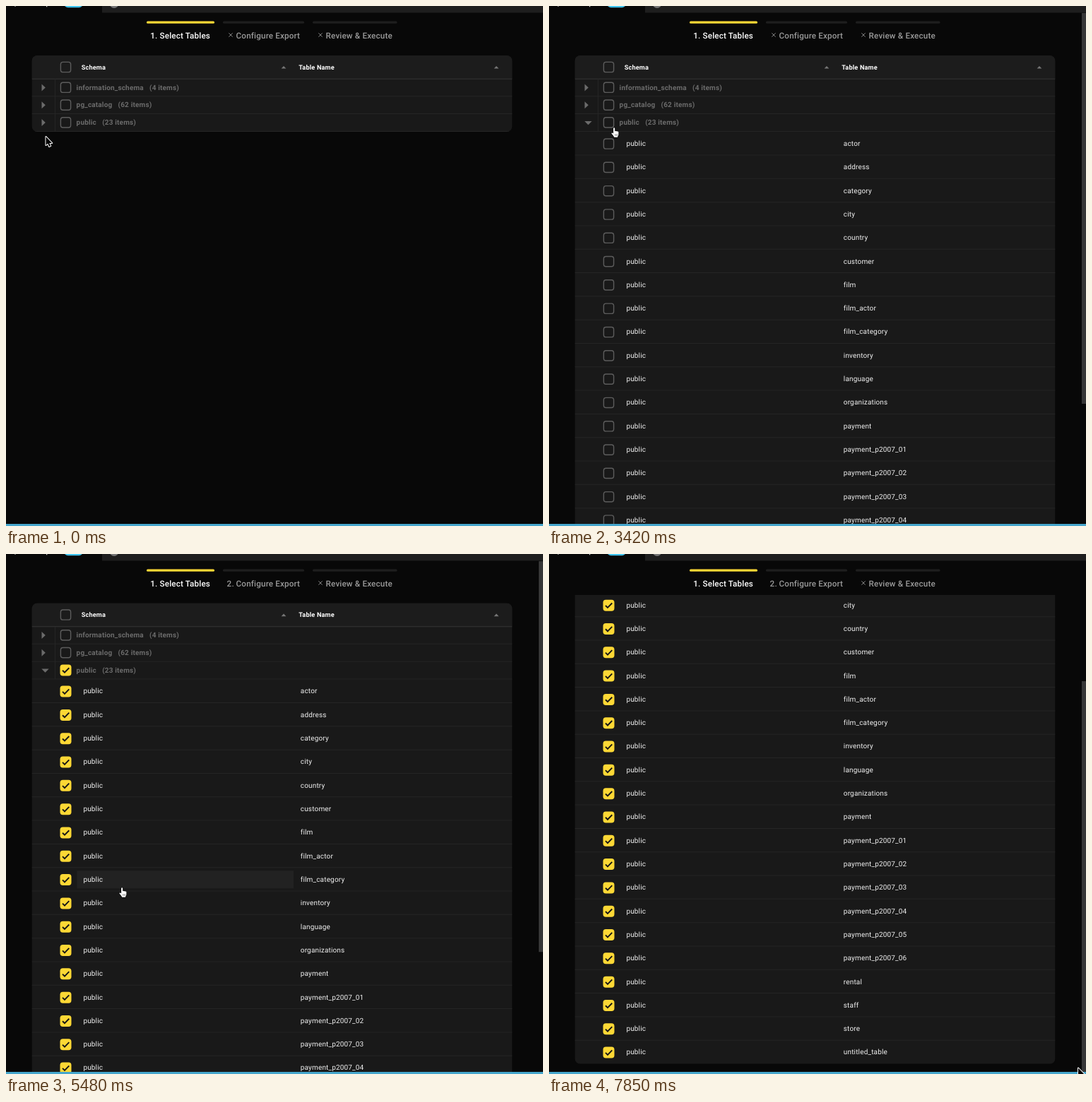
An HTML page with a canvas that plays this animation: 760 px wide and 736 px high, repeating every 8000 ms.

```html
<!DOCTYPE html>
<html lang="en">
<head>
<meta charset="utf-8">
<title>Select tables</title>
<style>
html, body { margin: 0; height: 100%; overflow: hidden; background: #080808; }
canvas { display: block; }
</style>
</head>
<body>
<canvas id="stage" width="760" height="736"></canvas>
<script>
const ctx = document.getElementById('stage').getContext('2d');
const LOOP = 8000, TICK = 148;
const EXPAND = 16, PRESS = 29, CHECKED = 31, SCROLL_START = 36.2, SCROLL_END = 41; // in ticks
const LEFT = 36.5, TOP = 70, WIDTH = 680, ROW = 33.31, ROWS_TOP = 178, MAX_SCROLL = 222.3;
const YELLOW = '#fdd835', GRAY = '#6b6b6b', RULE = '#252525';

const payments = [1, 2, 3, 4, 5, 6].map(n => 'payment_p2007_0' + n);
const tables = [...('actor address category city country customer film film_actor film_category ' +
  'inventory language organizations payment').split(' '), ...payments,
  'rental', 'staff', 'store', 'untitled_table'];
const groups = [['information_schema', 4], ['pg_catalog', 62], ['public', tables.length]];

// Eased pointer moves: start tick, end tick, destination
const moves = [
  [0, 1, 52, 160], [3, 5, 51, 166], [9, 11, 53.5, 173], [12, 13, 48.5, 165],
  [18, 21, 98, 162], [21, 23, 88, 172], [24, 27, 82.5, 159], [31, 36, 160, 472],
  [42, 43, 157, 470.5], [43, 50, 354, 628], [50, 53, 749, 727.5]
];

const progress = (t, from, to) => Math.min(1, Math.max(0, (t - from) / (to - from)));
const smooth = p => p * p * (3 - 2 * p);
const quintic = p => p < .5 ? 16 * p ** 5 : 1 - 16 * (1 - p) ** 5;

function pointerAt(tick) {
  let x = 56.5, y = 185;
  for (const [from, to, toX, toY] of moves) {
    const p = smooth(progress(tick, from, to));
    x += (toX - x) * p;
    y += (toY - y) * p;
  }
  return [x, y];
}

const arrow = new Path2D('M0 0V12L2.7 9.6L4.6 14L6.7 13.1L4.8 8.9H8.6Z');
const hand = new Path2D('M3.1 8.6V1.3a1 1 0 0 1 2.1 0V5.6a.9.9 0 0 1 1.8.1a.9.9 0 0 1 1.8.4' +
  'a.8.8 0 0 1 1.6.6V9.5q0 2-1.2 3.2V13.8H4.3Q3.8 12.3 .4 8.4q.2-1.5 1.5-.8z');
const knuckles = new Path2D('M5.6 9.2V11.8M7.1 9.2V11.8M8.6 9.2V11.8');

function rect(x, y, w, h, color, radius = 0) {
  ctx.fillStyle = color;
  ctx.beginPath();
  ctx.roundRect(x, y, w, h, radius);
  ctx.fill();
}

function poly(points, color) {
  ctx.fillStyle = color;
  ctx.beginPath();
  for (let i = 0; i < points.length; i += 2) ctx.lineTo(points[i], points[i + 1]);
  ctx.fill();
}

function line(points, color, width) {
  ctx.strokeStyle = color;
  ctx.lineWidth = width;
  ctx.beginPath();
  for (let i = 0; i < points.length; i += 2) ctx.lineTo(points[i], points[i + 1]);
  ctx.stroke();
}

// Returns the x where the text ends
function text(string, x, y, color, size = 10, weight = 400) {
  ctx.font = `${weight} ${size}px Roboto, sans-serif`;
  ctx.letterSpacing = '0.16px';
  ctx.textRendering = 'geometricPrecision';
  ctx.fillStyle = color;
  ctx.fillText(string, x, y);
  return x + ctx.measureText(string).width;
}

function checkbox(y, state) {
  if (state) {
    rect(76.5, y - 8, 16, 16, state === 'on' ? YELLOW : '#ececec', 4);
    if (state === 'on') line([80, y + .3, 83, y + 3.3, 89.3, y - 3.2], '#151515', 1.9);
    return;
  }
  ctx.strokeStyle = '#5c5c5c';
  ctx.lineWidth = 1.4;
  ctx.beginPath();
  ctx.roundRect(77.4, y - 7.1, 14.2, 14.2, 3.2);
  ctx.stroke();
}

function drawHeader() {
  rect(LEFT, TOP, WIDTH, 33, '#1c1c1c');
  rect(LEFT, 102.7, WIDTH, 1.1, '#343434');
  checkbox(86.5);
  text('Schema', 106.7, 89.7, '#fff', 9.17, 600);
  text('Table Name', 414.3, 89.7, '#fff', 9.17, 600);
  for (const x of [393, 694]) poly([x - 3.4, 88.6, x + 3.4, 88.6, x, 85], '#777');
}

function drawGroup([name, count], i, open, state) {
  const y = 115.3 + i * 24.8;
  rect(LEFT, y + 12, WIDTH, 1, RULE);
  if (open) poly([50.3, y - 2, 60.7, y - 2, 55.5, y + 3.4], GRAY);
  else poly([50.5, y - 4.8, 50.5, y + 5.2, 55.8, y + .2], GRAY);
  checkbox(y, state);
  const end = text(name, 99.6, y + 3.3, GRAY, 10, 600);
  text(`(${count} items)`, end + 8.2, y + 3.3, GRAY, 10, 600);
}

function drawRow(name, i, state, hoverX, hoverY) {
  const top = ROWS_TOP + i * ROW, mid = top + ROW / 2;
  if (hoverY >= top && hoverY < top + ROW) {
    if (hoverX > 100 && hoverX < 407) rect(100.5, mid - 12.5, 306.5, 25, '#222');
    else if (hoverX >= 407 && hoverX < 716) rect(407, mid - 12.5, 302, 25, '#222');
  }
  if (i < tables.length - 1) rect(LEFT, top + ROW - .8, WIDTH, 1, RULE);
  checkbox(mid + .4, state);
  text('public', 109.4, mid + 3.3, '#f0f0f0');
  text(name, 416.8, mid + 3.3, '#f0f0f0');
}

function drawTable(tick, scroll, x, y) {
  const open = tick >= EXPAND, checked = tick >= CHECKED;
  const height = ROWS_TOP - TOP + (open ? tables.length * ROW : 0);
  ctx.save();
  ctx.beginPath();
  ctx.rect(0, 58, 760, 675);
  ctx.clip();
  ctx.translate(0, -scroll);
  ctx.beginPath();
  ctx.roundRect(LEFT, TOP, WIDTH, height, 8);
  ctx.clip();
  rect(LEFT, TOP, WIDTH, height, '#191919');
  drawHeader();
  rect(69, 103.5, 1, 74, RULE);
  groups.forEach((group, i) => {
    const last = i === groups.length - 1;
    drawGroup(group, i, open && last, last && (checked ? 'on' : tick >= PRESS && 'pressed'));
  });
  if (open) tables.forEach((name, i) => drawRow(name, i, checked && 'on', x + 3, y + scroll));
  ctx.restore();
}

function cross(x, y) {
  line([x - 2.7, y - 2.7, x + 2.7, y + 2.7], '#8f8f8f', .9);
  line([x - 2.7, y + 2.7, x + 2.7, y - 2.7], '#8f8f8f', .9);
}

function drawSteps(ready) {
  const bar = (x, width, color) => rect(x, 21.4, width, 3.4, color, 1.5);
  const label = (string, x, color = '#999') => text(string, x, 45.7, color, 11.67, 500);
  bar(199, 96, YELLOW);
  bar(307, 115, '#1e1e1e');
  bar(434, 119.5, '#1e1e1e');
  label('1. Select Tables', 204.3, '#fff');
  label('Configure Export', 325.6);
  if (ready) label('2.', 312.6);
  else cross(318, 41);
  cross(445, 41);
  label('Review & Execute', 452.6);
}

function drawFrame(scroll, open) {
  rect(136, 0, 624, 9.5, '#1e1e1e');
  rect(12, 0, 2, .7, '#999');
  rect(57, 0, 1.3, 1.2, '#ddd');
  rect(82.5, -10, 26, 12.3, '#40c4ee', 5);
  rect(146.5, -10, 13, 13, '#777', 6.5);
  if (open) rect(754, 10 + scroll * .765, 6, 553, '#373737');
  rect(0, 733, 760, 3, '#45a6cc');
}

function drawPointer(x, y, isArrow) {
  ctx.save();
  ctx.translate(x, y);
  ctx.lineJoin = 'round';
  ctx.fillStyle = isArrow ? '#000' : '#fff';
  ctx.strokeStyle = isArrow ? '#fff' : '#000';
  ctx.lineWidth = isArrow ? 2 : 1.2;
  const shape = isArrow ? arrow : hand;
  ctx.stroke(shape);
  ctx.fill(shape);
  if (!isArrow) {
    ctx.lineWidth = .4;
    ctx.stroke(knuckles);
  }
  ctx.restore();
}

function draw(time) {
  const tick = Math.floor(time % LOOP / TICK);
  const [x, y] = pointerAt(tick);
  const scroll = MAX_SCROLL * quintic(progress(tick, SCROLL_START, SCROLL_END));
  rect(0, 0, 760, 736, '#080808');
  drawTable(tick, scroll, x, y);
  drawSteps(tick >= CHECKED);
  drawFrame(scroll, tick >= EXPAND);
  drawPointer(x, y, x > 716 || (tick < EXPAND && y > ROWS_TOP));
  requestAnimationFrame(() => draw(performance.now() - start));
}

const start = performance.now();
draw(0);
</script>
</body>
</html>
```
